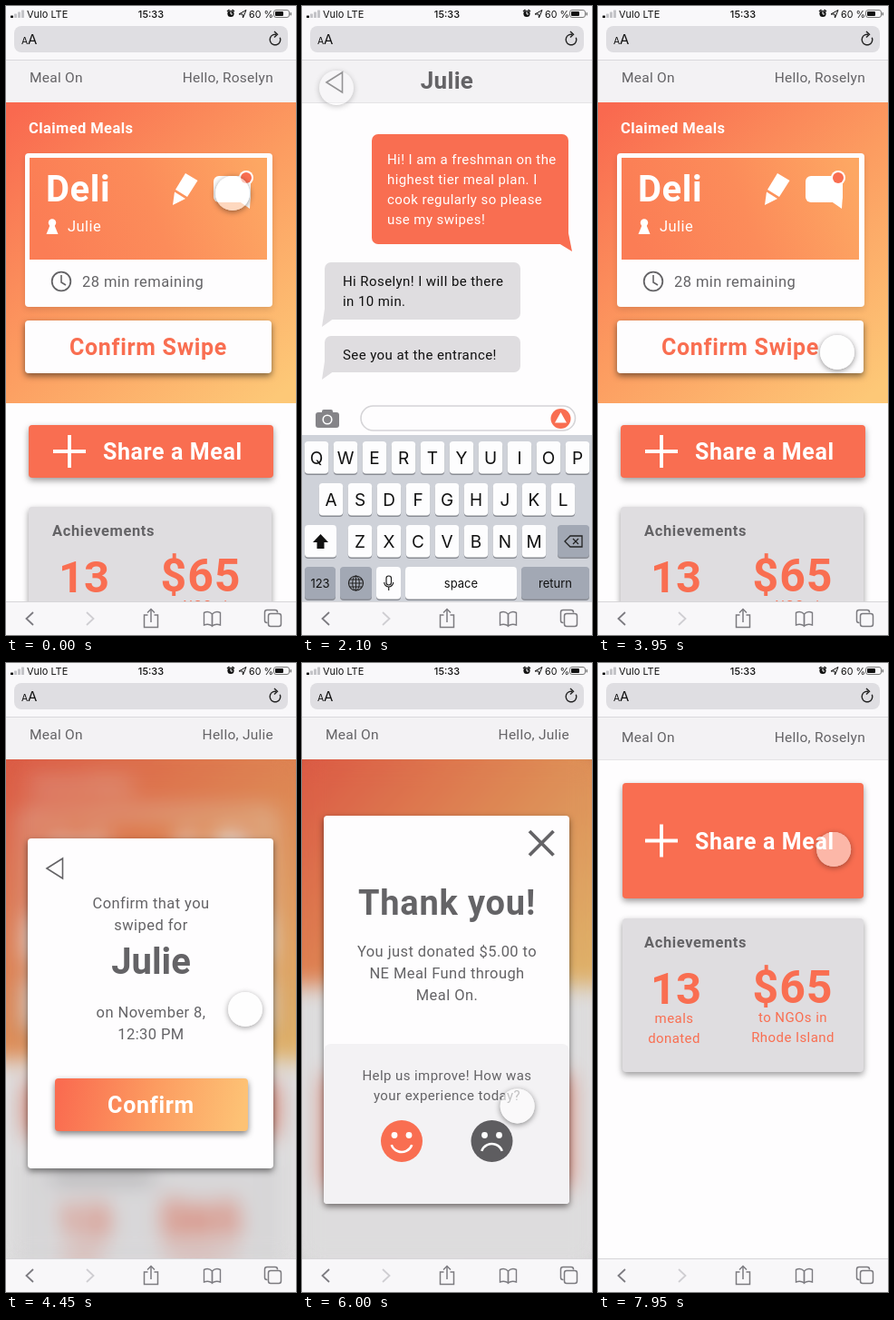
Write an HTML page with a canvas that moves like this. It is 320 px wide and 692 px high and loops after 8 s.

```html
<!DOCTYPE html>
<html lang="en">
<head>
<meta charset="utf-8">
<title>Meal sharing prototype</title>
<style>
html, body { margin: 0; width: 100%; height: 100%; overflow: hidden; background: #fdfdfe; }
canvas { display: block; width: 320px; height: 692px; }
</style>
</head>
<body>
<canvas id="stage"></canvas>
<script>
const W = 320, H = 692, LOOP = 8000, FADE = 300, TOP = 106;
const dpr = Math.max(1, window.devicePixelRatio || 1);
const CORAL = '#f96e51', GREY = '#646366', WHITE = '#fefdfe', PALE = '#dfdde0', HEAD = '#f3f2f4';
const BODY = 'Roboto, sans-serif', UI = 'Inter, sans-serif';
const APP = 'Meal On', OWNER = 'Roselyn', GUEST = 'Julie';
let g;

function surface(canvas) {
  canvas.width = W * dpr;
  canvas.height = H * dpr;
  const ctx = canvas.getContext('2d');
  ctx.scale(dpr, dpr);
  return ctx;
}

function scene(...parts) {
  const canvas = document.createElement('canvas');
  g = surface(canvas);
  for (const part of parts) part();
  return canvas;
}

// ---- drawing helpers ----
function text(str, x, y, size, color, { bold = 0, align = 'left', gap = 0, font = BODY } = {}) {
  g.font = `${bold || 400} ${size}px ${font}`;
  g.letterSpacing = gap + 'px';
  g.textAlign = align;
  g.fillStyle = color;
  g.fillText(str, x, y);
  g.letterSpacing = '0px';
}
const bold = (str, x, y, size, color, gap = 0.7, align = 'left') =>
  text(str, x, y, size, color, { bold: 700, gap, align });
const copy = (str, x, y, size, color, align = 'left') =>
  text(str, x, y, size, color, { gap: 0.42, align });

function box(x1, y1, x2, y2, r, fill, shadow = 0) {
  g.save();
  if (shadow) {
    g.shadowColor = `rgba(0,0,0,${shadow})`;
    g.shadowBlur = 7 * dpr;
    g.shadowOffsetY = 3 * dpr;
  }
  g.fillStyle = fill;
  g.beginPath();
  g.roundRect(x1, y1, x2 - x1, y2 - y1, r);
  g.fill();
  g.restore();
}

function path(points, closed) {
  g.beginPath();
  points.forEach(([x, y]) => g.lineTo(x, y));
  if (closed) g.closePath();
}
function shape(color, ...points) {
  path(points, true);
  g.fillStyle = color;
  g.fill();
}
function stroke(color, width) {
  g.strokeStyle = color;
  g.lineWidth = width;
  g.stroke();
}
function line(color, width, ...points) {
  path(points, false);
  stroke(color, width);
}
function outline(color, width, x, y, w, h, r = 0) {
  g.beginPath();
  g.roundRect(x, y, w, h, r);
  stroke(color, width);
}
function dot(x, y, r, color) {
  g.beginPath();
  g.arc(x, y, r, 0, 7);
  g.fillStyle = color;
  g.fill();
}
function arc(x, y, r, from, to, color, width) {
  g.beginPath();
  g.arc(x, y, r, from, to);
  stroke(color, width);
}
function ramp(x1, y1, x2, y2, ...colors) {
  const grad = g.createLinearGradient(x1, y1, x2, y2);
  colors.forEach((c, i) => grad.addColorStop(i / (colors.length - 1), c));
  return grad;
}

// ---- phone frame ----
function statusBar() {
  for (let i = 0; i < 4; i++) {
    box(5 + i * 4, 10.5 - i * 2, 8 + i * 4, 13, 0.6, i < 1 ? '#111' : '#c4c4c8');
  }
  text('Vulo LTE', 23, 12.5, 11, '#111', { font: UI });
  text('15:33', 160, 12.5, 11, '#111', { bold: 500, align: 'center', font: UI });
  dot(248, 8.5, 3.6, '#111');
  line('#111', 1.5, [244, 6], [246.5, 4]);
  line('#111', 1.5, [249.5, 4], [252, 6]);
  line('#fff', 1, [248, 6], [248, 9], [250, 9]);
  path([[257, 9], [265, 4.5], [261.5, 13], [261, 9]], true);
  stroke('#111', 1);
  text('60 %', 268, 12.5, 10.7, '#111', { font: UI });
  outline('#777', 1, 295.5, 4.5, 17, 8, 2.5);
  box(297, 6, 306, 11, 1, '#111');
  box(313.5, 7, 315, 10.5, 0.7, '#777');
}

function chrome() {
  box(0, 0, W, 60, 0, '#f9f8fa');
  statusBar();
  box(9, 22, 311, 51, 8, '#dfdee2');
  text('A', 17, 41.5, 10.5, '#111', { font: UI });
  text('A', 24, 41.5, 15, '#111', { font: UI });
  arc(297, 37, 5.8, -0.4, 4.9, '#222', 1.4);
  line('#222', 1.4, [296, 28], [299.5, 31.3], [296, 34.5]);
  box(0, 59, W, 60, 0, '#d9d8dc');

  box(0, 655, W, H, 0, '#f8f7f9');
  box(0, 655, W, 656, 0, '#d6d5d8');
  const ink = '#7c7b80';
  line(ink, 1.8, [30, 667], [22.5, 674], [30, 681]);
  line('#cfced2', 1.8, [89, 667], [96.5, 674], [89, 681]);
  line(ink, 1.5, [156.5, 670], [152.5, 670], [152.5, 683.5], [167.5, 683.5], [167.5, 670], [163.5, 670]);
  line(ink, 1.5, [160, 678], [160, 664]);
  line(ink, 1.5, [156, 667.5], [160, 663.5], [164, 667.5]);
  for (const s of [-1, 1]) {
    g.beginPath();
    g.moveTo(227.5, 669);
    g.quadraticCurveTo(227.5 + s * 4, 665, 227.5 + s * 9, 667.5);
    g.lineTo(227.5 + s * 9, 681);
    g.quadraticCurveTo(227.5 + s * 4, 679, 227.5, 682);
    g.closePath();
    stroke(ink, 1.4);
  }
  outline(ink, 1.5, 285.5, 664.5, 14, 14, 2.5);
  box(288.5, 667.5, 304.5, 683.5, 3, '#f8f7f9');
  outline(ink, 1.5, 289.5, 668.5, 14, 14, 2.5);
}

function header(name, y = 84) {
  box(0, 60, W, TOP, 0, HEAD);
  text(APP, 26, y, 15.5, GREY, { gap: 0.25 });
  text('Hello, ' + name, 295, y, 15.5, GREY, { gap: 0.25, align: 'right' });
}
const headerEdge = () => box(0, TOP, W, TOP + 1, 0, '#e4e3e6');

// ---- home ----
const paper = () => box(0, 0, W, H, 0, WHITE);
const warmth = bottom =>
  box(0, TOP, W, bottom, 0, ramp(20, TOP, 290, bottom, '#f9694f', '#fc9b60', '#fdc877'));

function share(x1, y1, x2, y2) {
  const mid = (y1 + y2) / 2;
  box(x1, y1, x2, y2, 4, CORAL, 0.4);
  line('#fff', 3.8, [52, mid], [88, mid]);
  line('#fff', 3.8, [70, mid - 18], [70, mid + 18]);
  bold('Share a Meal', 107, mid + 9, 25, '#fff', 0.6);
}

function achievements(x, y, fill = PALE) {
  box(x, y, 293, y + 169, 4, fill, 0.4);
  bold('Achievements', 51, y + 32, 16.5, GREY, 0.6);
  bold('13', 86, y + 94, 49, CORAL, 0, 'center');
  bold('$65', 215, y + 93, 50, CORAL, 1, 'center');
  copy('meals', 84, y + 115, 15, CORAL, 'center');
  copy('donated', 84, y + 137, 15, CORAL, 'center');
  copy('to NGOs in', 215, y + 114, 15, CORAL, 'center');
  copy('Rhode Island', 215, y + 136, 15, CORAL, 'center');
}

function claimCard() {
  bold('Claimed Meals', 25, 140, 16.5, '#fff', 0.4);
  box(21, 162, 294, 331, 4, WHITE, 0.12);
  box(26, 167, 288, 279, 0, ramp(40, 260, 280, 175, '#fb7d55', '#fc8c5a', '#fda763'));
  bold('Deli', 44, 215, 40, '#fff', 0.6);
  dot(51, 238.5, 4.2, '#fff');
  shape('#fff', [49, 240], [53, 240], [57.5, 251], [44.5, 251]);
  copy(GUEST, 68, 248, 16.5, '#fff');
  shape('#fff', [198, 184], [211.5, 192], [200, 210], [187, 202]);
  shape('#fff', [186, 204.5], [198, 212], [184, 219]);
  box(229, 187, 270, 216, 6, '#fff');
  shape('#fff', [256, 214], [270, 208], [269, 223]);
  dot(265, 189, 8, '#fff');
  dot(265, 189, 6, CORAL);
  arc(61, 303, 10.3, 0, 7, GREY, 1.8);
  line(GREY, 1.6, [61, 296], [61, 304], [66, 307]);
  copy('28 min remaining', 84, 308.5, 16.5, GREY);
}

function homeTop() {
  paper();
  warmth(437);
  claimCard();
  box(21, 346, 293, 404, 4, WHITE, 0.5);
  bold('Confirm Swipe', 157, 384, 25, CORAL, 0.7, 'center');
  share(25, 461, 295, 519);
}

function homeBody() {
  homeTop();
  achievements(25, 551);
}

function finalBody() {
  paper();
  share(27, 132, 293, 259);
  achievements(27, 281);
}

// ---- chat ----
function bubble(x1, y1, x2, y2, fill, ink, lines, tailX) {
  const received = tailX < x1;
  const side = received ? x1 : x2, inner = received ? x1 + 9 : x2 - 10;
  box(x1, y1, x2, y2, 7, fill);
  shape(fill, [side, y2 - 12], [tailX, y2 + 8], [inner, y2 - 0.5]);
  lines.forEach((s, i) => copy(s, x1 + (received ? 20 : 17), y1 + (received ? 26 : 33) + i * 22, 15, ink));
}

function key(x1, y, x2, label, fill = '#fdfdfe', size = 19) {
  box(x1, y + 1, x2, y + 37, 4, '#898c93');
  box(x1, y, x2, y + 35.5, 4, fill);
  if (label) text(label, (x1 + x2) / 2, y + 18 + size * 0.36, size, '#111', { align: 'center', font: UI });
}

function keyboard() {
  const dark = '#a2a8b4';
  box(0, 472, W, 656, 0, '#cfd2d9');
  [['QWERTYUIOP', 16, 479], ['ASDFGHJKL', 32, 525], ['ZXCVBNM', 64, 571]].forEach(([row, x, y]) =>
    [...row].forEach((c, i) => key(x + i * 32 - 13.2, y, x + i * 32 + 13.2, c)));
  key(3, 571, 38, '');
  shape('#111', [20.5, 581], [29, 590], [24.5, 590], [24.5, 597], [16.5, 597], [16.5, 590], [12, 590]);
  key(282, 571, 317, '', dark);
  path([[290, 589], [296, 583], [309, 583], [309, 595], [296, 595]], true);
  stroke('#222', 1.3);
  line('#222', 1.3, [299, 586], [305, 592]);
  line('#222', 1.3, [305, 586], [299, 592]);
  key(3, 617, 37, '123', dark, 13);
  key(42, 617, 77, '', dark);
  arc(59.5, 635, 8, 0, 7, '#222', 1.2);
  g.beginPath();
  g.ellipse(59.5, 635, 3.8, 8, 0, 0, 7);
  stroke('#222', 1);
  line('#222', 1, [59.5, 627], [59.5, 643]);
  for (const dy of [-4, 0, 4]) line('#222', 1, [52.5, 635 + dy], [66.5, 635 + dy]);
  key(82, 617, 109, '');
  outline('#222', 1.2, 93, 627, 5.5, 10, 2.7);
  arc(95.7, 634, 5, 0, Math.PI, '#222', 1.2);
  line('#222', 1.2, [95.7, 639], [95.7, 643]);
  key(114, 617, 237, 'space', '#fdfdfe', 13);
  key(242, 617, 317, 'return', dark, 13);
}

function backArrow(x, y) {
  path([[x, y], [x + 17.5, y - 11], [x + 17.5, y + 11]], true);
  stroke(GREY, 1.6);
}

function chat() {
  paper();
  box(0, 60, W, TOP, 0, HEAD);
  headerEdge();
  bold(GUEST, 160, 91, 26, GREY, 0.3, 'center');
  backArrow(27, 84);
  bubble(77, 141, 294, 262, CORAL, '#fff',
    ['Hi! I am a freshman on the', 'highest tier meal plan. I', 'cook regularly so please', 'use my swipes!'], 298);
  bubble(25, 282, 241, 345, PALE, '#111', [`Hi ${OWNER}! I will be there`, 'in 10 min.'], 22);
  bubble(25, 363, 241, 403, PALE, '#111', ['See you at the entrance!'], 22);
  box(15, 447, 41, 464, 3, '#858488');
  box(22, 444, 34, 450, 2, '#858488');
  arc(28, 455, 4.8, 0, 7, '#fff', 1.6);
  outline('#d5d4d7', 1.6, 65, 440, 236.5, 27, 13.5);
  dot(285.5, 454, 11, CORAL);
  shape('#fff', [285.5, 447], [292, 458.5], [279, 458.5]);
  keyboard();
}

// ---- dialogs ----
function backdrop(image) {
  const h = 656 - TOP;
  g.save();
  g.beginPath();
  g.rect(0, TOP, W, h);
  g.clip();
  g.filter = `blur(${12 * dpr}px)`;
  // Repeated passes make the soft outer edges opaque.
  for (let i = 0; i < 5; i++) g.drawImage(image, 0, TOP * dpr, W * dpr, h * dpr, 0, TOP, W, h);
  g.filter = 'none';
  box(0, TOP, W, 656, 0, 'rgba(0,0,0,.12)');
  g.restore();
}

function confirmBackground() {
  homeTop();
  achievements(25, 537, '#f6f5f7');
}

function thanksBackground() {
  box(0, 0, W, H, 0, '#fbfafb');
  warmth(355);
  box(27, 454, 293, 576, 4, CORAL);
}

function confirmDialog() {
  box(24, 193, 295, 556, 4, WHITE, 0.5);
  backArrow(45, 226);
  const say = (s, y) => copy(s, 160, y, 16.5, GREY, 'center');
  say('Confirm that you', 270);
  say('swiped for', 294);
  bold(GUEST, 160, 342, 40, GREY, 0, 'center');
  say('on November 8,', 390);
  say('12:30 PM', 414);
  box(54, 457, 267, 515, 4, ramp(60, 465, 260, 505, '#fa6c50', '#fc9b60', '#fdc275'), 0.5);
  bold('Confirm', 160, 495, 25, '#fff', 0.7, 'center');
}

function face(x, color, happy) {
  dot(x, 526, 23, color);
  dot(x - 8, 519.5, 3.4, '#fff');
  dot(x + 8, 519.5, 3.4, '#fff');
  if (happy) arc(x, 526, 12, 0.35, Math.PI - 0.35, '#fff', 2.6);
  else arc(x, 541, 12, Math.PI + 0.35, -0.35, '#fff', 2.6);
}

function thanksDialog() {
  box(24, 168, 295, 595, 4, WHITE, 0.5);
  box(24, 419, 295, 595, [8, 8, 4, 4], HEAD);
  line(GREY, 3.8, [251, 185], [277.5, 211.5]);
  line(GREY, 3.8, [277.5, 185], [251, 211.5]);
  bold('Thank you!', 160, 277, 38, GREY, 0.8, 'center');
  ['You just donated $5.00 to', 'NE Meal Fund through', APP + '.'].forEach((s, i) =>
    copy(s, 160, 323 + i * 24, 16.5, GREY, 'center'));
  copy('Help us improve! How was', 160, 459, 15, GREY, 'center');
  copy('your experience today?', 160, 481, 15, GREY, 'center');
  face(110, CORAL, true);
  face(209.5, '#5e5d60', false);
}

// ---- scenes and timing ----
const confirmImage = scene(confirmBackground), thanksImage = scene(thanksBackground);
const home = scene(homeBody, () => header(OWNER), chrome);
const timeline = [
  [-FADE, home],
  [300, scene(chat, chrome)],
  [2250, home],
  [4100, scene(() => backdrop(confirmImage), () => header(GUEST), confirmDialog, chrome)],
  [5400, scene(() => backdrop(thanksImage), () => header(GUEST), thanksDialog, chrome)],
  [7350, scene(finalBody, () => header(OWNER, 86.5), headerEdge, chrome)]
];
// Each press: start, end, then where it begins and where it drifts to.
const presses = [
  [-400, 450, 250, 206, 250, 206],
  [2000, 2850, 38, 90, 38, 90],
  [3750, 4600, 264, 381, 264, 381],
  [5000, 6200, 246, 480, 237, 488],
  [7230, 8100, 262, 205, 260, 205]
];
const PRESS_FADE = 200;
const clamp = p => Math.min(1, Math.max(0, p));
const smooth = p => p * p * (3 - 2 * p);

function drawPress(x, y, alpha) {
  const r = 19;
  g.save();
  g.globalAlpha = alpha;
  g.save();
  g.beginPath();
  g.rect(0, 0, W, H);
  g.arc(x, y, r, 0, 7);
  g.clip('evenodd');
  g.shadowColor = 'rgba(0,0,0,.45)';
  g.shadowBlur = 6 * dpr;
  g.shadowOffsetY = 1.5 * dpr;
  dot(x, y, r, '#fff');
  g.restore();
  dot(x, y, r, 'rgba(255,255,255,.6)');
  g.restore();
}

const stage = surface(document.getElementById('stage'));
const start = performance.now();

function frame(now) {
  const t = Math.max(0, now - start) % LOOP;
  g = stage;
  const current = timeline.filter(([at]) => at <= t);
  for (const [at, image] of current.slice(-2)) {
    g.globalAlpha = smooth(clamp((t - at) / FADE));
    g.drawImage(image, 0, 0, W, H);
  }
  g.globalAlpha = 1;
  for (const [from, to, x1, y1, x2, y2] of presses) {
    const alpha = smooth(clamp(Math.min(t - from, to - t) / PRESS_FADE));
    const p = smooth(clamp((t - from) / (to - from)));
    if (alpha > 0) drawPress(x1 + (x2 - x1) * p, y1 + (y2 - y1) * p, alpha);
  }
  requestAnimationFrame(frame);
}
requestAnimationFrame(frame);
</script>
</body>
</html>
```
